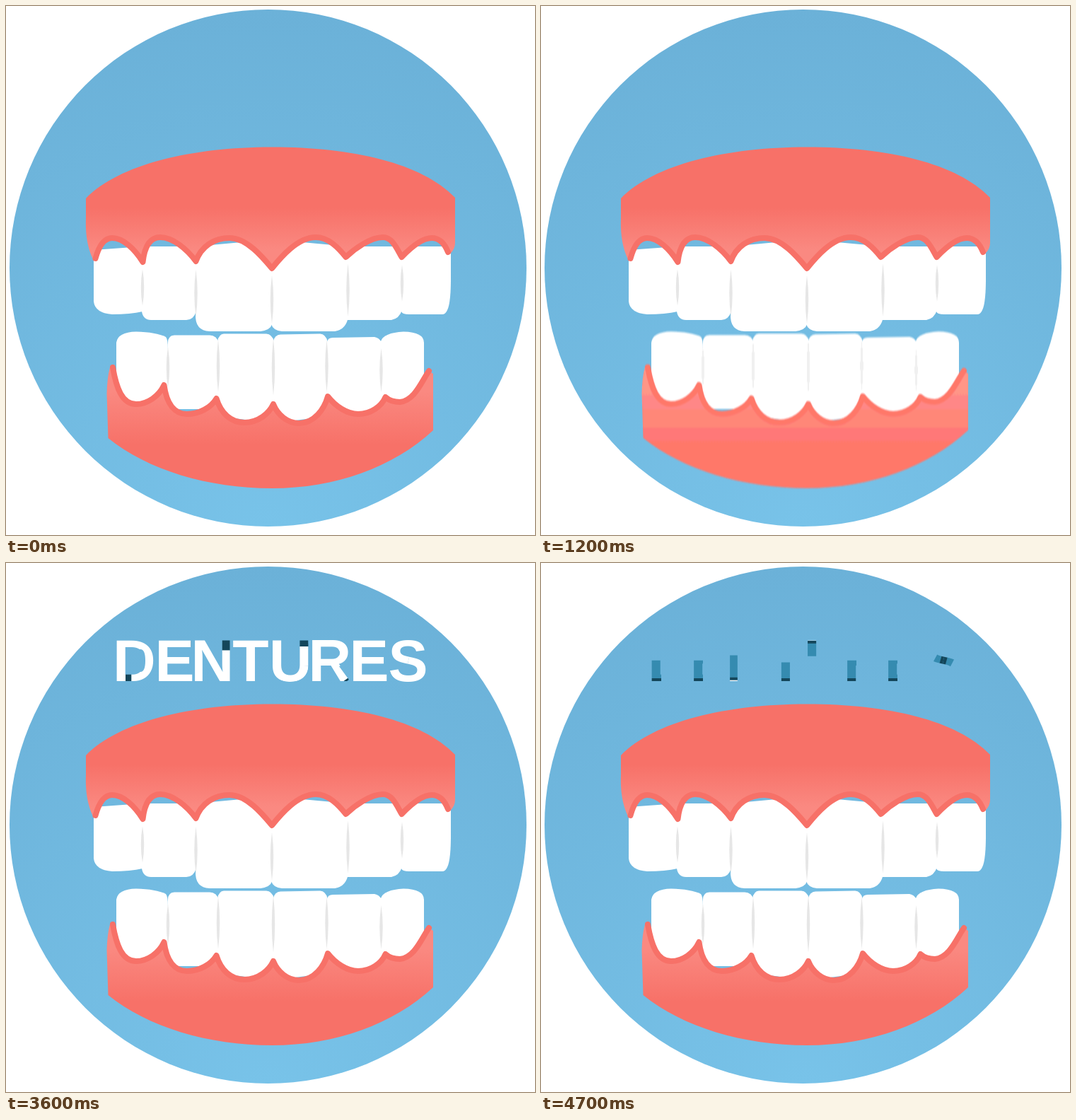
An HTML page with a canvas that plays this animation: 748x748 px, repeating every 4800 ms.

```html
<!DOCTYPE html>
<html lang="en">
<head>
<meta charset="utf-8">
<title>Dentures</title>
<style>
  html, body { margin: 0; width: 100%; height: 100%; overflow: hidden; background: #fff; }
  canvas { display: block; width: 748px; height: 748px; }
</style>
</head>
<body>
<canvas id="stage" width="748" height="748"></canvas>
<script>
const SIZE = 748, LOOP = 4800, STEP = 100;
const RED = '#f77168', PINK = '#fa8981', SEAM = '#e6e6e6';
const TEAL = '#358bb0', DARK = '#14465a';

const ctx = document.getElementById('stage').getContext('2d');

function layer(paint) {
  const c = document.createElement('canvas');
  c.width = c.height = SIZE;
  const g = c.getContext('2d');
  if (paint) paint(g);
  return g;
}

function vertical(g, y0, c0, y1, c1) {
  const grad = g.createLinearGradient(0, y0, 0, y1);
  grad.addColorStop(0, c0);
  grad.addColorStop(1, c1);
  return grad;
}

function fill(g, d, style) {
  g.fillStyle = style;
  g.fill(new Path2D(d));
}

function seam(g, x, top, bottom) {
  const mid = (top + bottom) / 2;
  fill(g, `M${x} ${top}Q${x + 4.5} ${mid} ${x} ${bottom}Q${x - 4.5} ${mid} ${x} ${top}Z`, SEAM);
}

function gum(g, rim, rest, shade) {
  fill(g, rim + rest, shade);
  g.strokeStyle = RED;
  g.lineWidth = 8;
  g.lineCap = g.lineJoin = 'round';
  g.stroke(new Path2D(rim));
}

const backdrop = layer(g => {
  const grad = g.createRadialGradient(370, 740, 0, 370, 740, 740);
  grad.addColorStop(0, '#78c3e9');
  grad.addColorStop(1, '#6bb1d8');
  g.fillStyle = '#fff';
  g.fillRect(0, 0, SIZE, SIZE);
  g.fillStyle = grad;
  g.beginPath();
  g.arc(370.5, 370.5, 365.5, 0, Math.PI * 2);
  g.fill();
});

const upper = layer(g => {
  [
    'M124 345V418Q126 434 150 436Q176 436 193 432V340Z',
    'M192 340V432Q194 444 205 444H255Q265 444 269 432V340Z',
    'M268 340V436Q267 459 288 460H360Q374 458 376 450V330Z',
    'M375 330V450Q378 459 390 460H465Q482 457 484 438V340Z',
    'M483 340V444H545Q556 442 560 430V340Z',
    'M559 340V432Q560 436 570 436H617C627 436 629 412 629 385V340Z'
  ].forEach(d => fill(g, d, '#fff'));
  seam(g, 193, 372, 424);
  seam(g, 268.5, 373, 439);
  seam(g, 376, 381, 449);
  seam(g, 483.5, 364, 439);
  seam(g, 560, 366, 418);
  gum(g,
    'M126.5 357C132 337 140 328 150 328C166 328 182 344 193.5 362C196 340 204 327 218 327' +
    'C236 327 256 344 268.5 361C276 340 294 328 316 328C340 328 362 354 376 371' +
    'C388 356 412 327 438 327C456 327 470 342 480.5 355C492 344 515 327 533 327' +
    'C546 327 552 342 559.5 355C570 344 588 328 602 328C614 328 621 338 625 348',
    'L628 350Q635 344 635 335V271C588 222 490 199.5 376 199.5S160 224 113 272' +
    'V300C112 328 117 345 123 358Z',
    vertical(g, 285, RED, 345, PINK));
});

const lower = layer(g => {
  [
    'M156 560V476Q158 461 184 460.5Q212 461 226 468Q229 471 229 486V570H170Z',
    'M229 570V476Q229 466 238 465.5H288Q298 466 300 475V570Z',
    'M299 580V474Q301 464 308 463.5H368Q376 464 379 474V590Z',
    'M378 590V474Q380 465 388 464.5L444 463.5Q452 464 454.5 474V580Z',
    'M454 580V475Q455 469 462 469L521 468Q528 469 531 476V570Z',
    'M530 560V474Q534 462 562 460.5Q591 461 591 476V545L570 560Z'
  ].forEach(d => fill(g, d, '#fff'));
  seam(g, 229, 482, 540);
  seam(g, 300, 472, 546);
  seam(g, 378, 470, 551);
  seam(g, 453.5, 472, 546);
  seam(g, 530.5, 484, 546);
  gum(g,
    'M151 511C156 540 164 563 184 563C200 563 216 552 223.5 536C227 562 238 577 256 577' +
    'C273 577 290 568 297.5 555C304 576 318 589 337 589C357 589 372 576 378 563' +
    'C384 578 398 590 414 590C436 590 450 570 455 552C466 566 482 577 498 577' +
    'C516 577 531 566 536.5 553C542 558 550 560 557 560C578 558 588 530 598 516',
    'L604 520V600C548 652 466 682 376 682S200 656 144.5 611L142.5 548Q143 525 147 511Z',
    vertical(g, 545, PINK, 620, RED));
});

// Glyph origins for the word
const mask = layer(g => {
  const origins = [151, 210.5, 261.5, 320.3, 372, 427.5, 485.5, 540.5];
  g.font = 'bold 84px "Liberation Sans", Arial, sans-serif';
  g.fillStyle = '#fff';
  [...'DENTURES'].forEach((ch, i) => g.fillText(ch, origins[i], 167));
});

// Ribbon strokes of each letter: path, start, end
const STEM = ['M6 58V0', 0, 0.2];
const RIBBON = {
  D: [STEM, ['M12 6H33', 0.25, 0.6], ['M33 6Q47 6 47 29Q47 52 33 52', 0.5, 0.85], ['M33 52H12', 0.75, 1]],
  E: [STEM, ['M12 52H48', 0.15, 0.52], ['M12 28H45', 0.35, 0.65], ['M12 6H48', 0.55, 0.95]],
  N: [['M6 58V0', 0, 0.16], ['M8 0L42 58', 0.3, 0.7], ['M43.5 58V0', 0.6, 1]],
  T: [['M6 58V0', 0, 0.22], ['M6 6H-19', 0.42, 0.9], ['M6 6H31', 0.42, 0.9]],
  U: [['M6 0V36', 0, 0.16], ['M6 36Q6 52 24 52', 0.15, 0.42], ['M24 52Q43 52 43.5 36', 0.35, 0.65], ['M43.5 36V0', 0.6, 1]],
  R: [STEM, ['M12 6H30', 0.15, 0.35], ['M30 6Q46 6 46 18Q46 31 30 31H12', 0.25, 0.52], ['M25 31L46 60', 0.55, 0.95]],
  S: [['M24 29Q6 25 6 16Q6 5 23 5', 0, 0.4], ['M23 5Q41 5 42 18', 0.37, 0.85],
      ['M24 29Q43 33 43 42Q42 53 23 53', 0, 0.4], ['M23 53Q5 53 4 38', 0.37, 0.85]]
};

function pathLength(d) {
  const el = document.createElementNS('http://www.w3.org/2000/svg', 'path');
  el.setAttribute('d', d);
  return el.getTotalLength();
}

const lefts = [157, 216, 267, 340, 377, 433, 491, 545];
const strokes = [...'DENTURES'].flatMap((ch, i) => RIBBON[ch].map(([d, from, to]) => ({
  x: lefts[i], path: new Path2D(d), len: pathLength(d), from, to
})));

const clamp = v => Math.min(1, Math.max(0, v));
const ribbon = layer();
const blur = layer();

function dash(g, s, a, b, color) {
  if (b <= a) return;
  g.strokeStyle = color;
  g.setLineDash([0, a, b - a, 999]);
  g.stroke(s.path);
}

function drawWord(p) {
  if (p <= 0) return;
  if (p >= 1) {
    ctx.drawImage(mask.canvas, 0, 0);
    return;
  }
  const g = ribbon;
  g.globalCompositeOperation = 'source-over';
  g.clearRect(0, 0, SIZE, SIZE);
  g.lineWidth = 14;
  for (const s of strokes) {
    const q = clamp((p - s.from) / (s.to - s.from));
    if (!q) continue;
    const flat = s.len * clamp((q - 0.3) / 0.7);
    const tip = s.len * clamp(q * 2);
    g.setTransform(1, 0, 0, 1, s.x, 109);
    dash(g, s, flat, tip, q > 0.7 ? DARK : TEAL);
    dash(g, s, flat, Math.min(flat + 4, tip), DARK);
    dash(g, s, 0, flat, '#fff');
  }
  g.setTransform(1, 0, 0, 1, 0, 0);
  g.globalCompositeOperation = 'destination-in';
  g.drawImage(mask.canvas, 0, 0);
  ctx.drawImage(g.canvas, 0, 0);
}

// Two bites at the start of the loop, one near the end
const BITE = 510, LIFT = 55, SHUTTER = 80, SAMPLES = 15;

function drawJaw(t) {
  const start = [190, 700, 4130].find(s => t > s && t < s + BITE);
  if (start === undefined) {
    ctx.drawImage(lower.canvas, 0, 0);
    return;
  }
  const a = Math.PI * (t - start) / BITE;
  const y = -LIFT * Math.sin(a) ** 2;
  const smear = SHUTTER * LIFT * Math.PI / BITE * Math.sin(2 * a);
  blur.globalCompositeOperation = 'lighter';
  blur.clearRect(0, 0, SIZE, SIZE);
  blur.globalAlpha = 1 / SAMPLES;
  for (let i = 0; i < SAMPLES; i++) {
    blur.drawImage(lower.canvas, 0, y + smear * (i / (SAMPLES - 1) - 0.5));
  }
  ctx.drawImage(blur.canvas, 0, 0);
}

function frame(now) {
  const t = Math.floor(now % LOOP / STEP) * STEP;
  ctx.drawImage(backdrop.canvas, 0, 0);
  drawWord(clamp(Math.min(t - 1237, 4763 - t) / 1250));
  drawJaw(t);
  ctx.drawImage(upper.canvas, 0, 0);
}

const begin = performance.now();
function tick() {
  frame(performance.now() - begin);
  requestAnimationFrame(tick);
}
tick();
</script>
</body>
</html>
```
